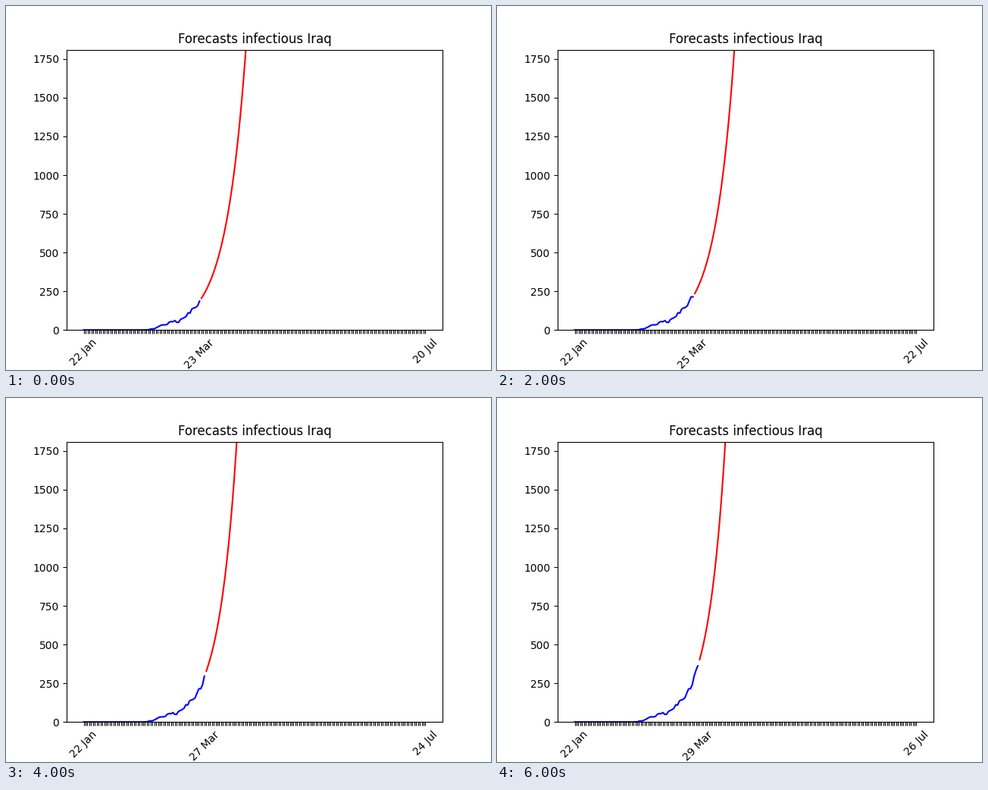
These frames come from a looping animation (640 by 480 pixels, 7 s). A matplotlib script:

```python
import numpy as np
import matplotlib.pyplot as plt
from matplotlib.animation import FuncAnimation

# Active cases per day, day 0 is 22 Jan
CASES = np.array([0] * 33 + [
    1, 1, 5, 7, 7, 13, 19, 26, 32, 33, 33, 36, 50, 54, 53, 61, 49, 49,
    68, 74, 80, 88, 111, 109, 136, 142, 146, 156, 186, 214, 214, 241,
    296, 333, 362])
FIRST_DAY = 61      # last observed day of the first forecast
HORIZON = 119       # days forecast ahead
Y_MAX = 5 * CASES[-1]
GROWTH = [0.0933, 0.0925, 0.0969, None, 0.1041, 0.1061, 0.1074]
MONTHS = [("Jan", 31), ("Feb", 29), ("Mar", 31), ("Apr", 30),
          ("May", 31), ("Jun", 30), ("Jul", 31)]
PEAK_DAY = 132

plt.rcParams["font.family"] = "DejaVu Sans"
fig, ax = plt.subplots(figsize=(6.4, 4.8), dpi=100)


def date_label(day):
    day += 22
    for name, length in MONTHS:
        if day <= length:
            return f"{day:02d} {name}"
        day -= length


def peaked_curve(days, start):
    """Logistic rise, then exponential decay."""
    cap = 6500
    rise = cap / (1 + (cap / CASES[start] - 1) * np.exp(-0.0756 * (days - start)))
    fall = 1303 * np.exp(-0.0374 * (days - days[-1]))
    return np.minimum(rise, fall)


def draw_band(end):
    """Uncertainty band whose lower bound sinks to zero."""
    zero_day = 177.5
    days = np.arange(PEAK_DAY, end + 1)
    left = np.clip((zero_day - days) / (zero_day - 133.7), 0, None)
    ax.fill_between(days, Y_MAX * left ** 1.65, 3 * Y_MAX,
                    color="#ececec", linewidth=0)


def draw(i):
    ax.clear()
    last = FIRST_DAY + i
    end = last + HORIZON
    days = np.arange(last + 1, end + 1)
    marked = [0, last, end]

    if GROWTH[i] is None:
        forecast = peaked_curve(days, last)
        draw_band(end)
        marked[2] = PEAK_DAY
    else:
        forecast = CASES[last] * np.exp(GROWTH[i] * (days - last))

    ax.plot(np.arange(last + 1), CASES[:last + 1], color="b")
    ax.plot(days, forecast, color="r")

    labels = [date_label(d) if d in marked else "" for d in range(end + 1)]
    ax.set_xticks(range(end + 1), labels, rotation=45)
    margin = 0.05 * end
    ax.set_xlim(-margin, end + margin)
    ax.set_ylim(0, Y_MAX)
    ax.set_title("Forecasts infectious Iraq")


anim = FuncAnimation(fig, draw, frames=len(GROWTH), interval=1000,
                     init_func=lambda: None, repeat=True, repeat_delay=0)
plt.show()
```
